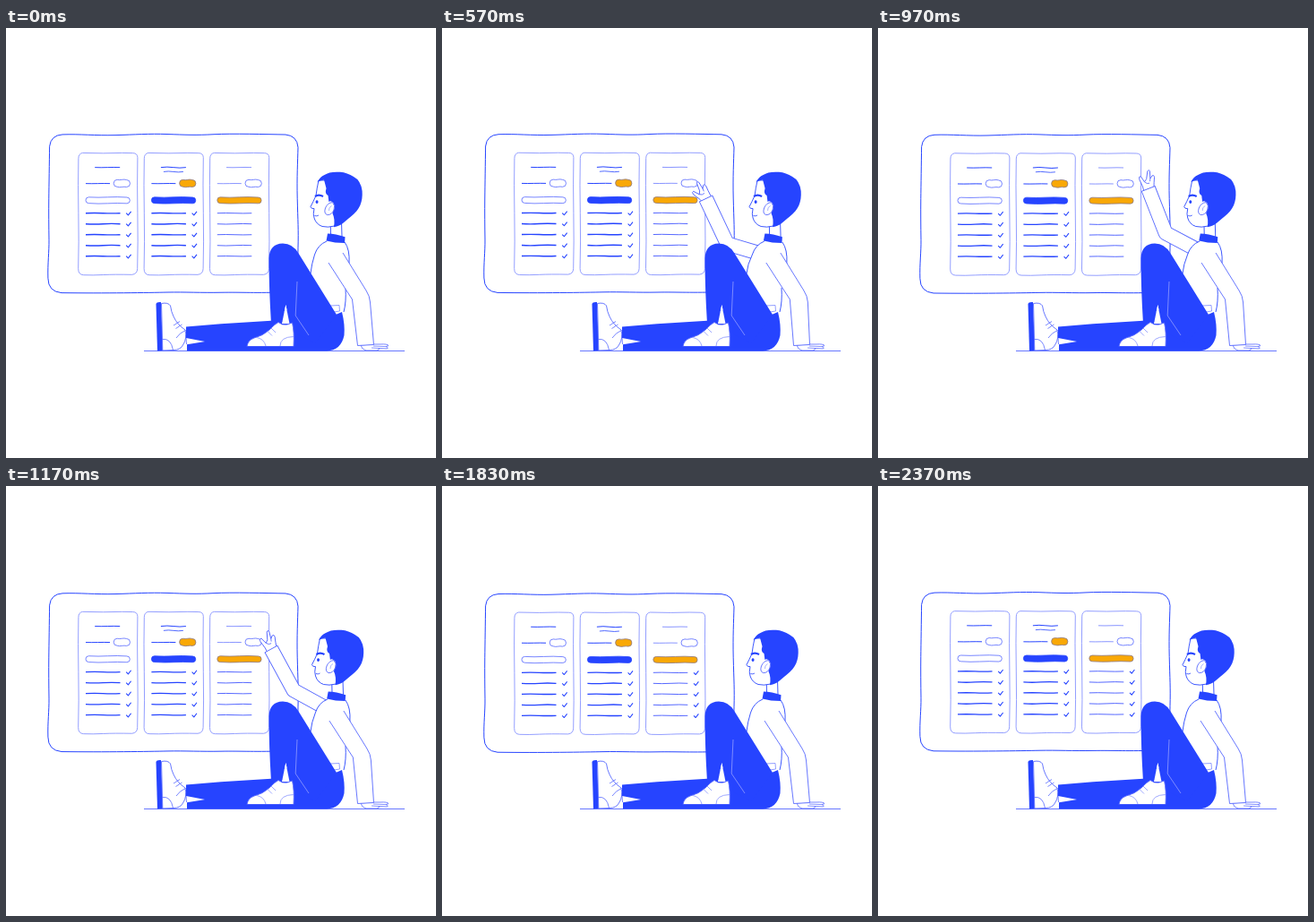
These frames come from a looping animation (480x480 px, 2470 ms). An HTML page with a canvas:

```html
<!DOCTYPE html>
<html lang="en">
<head>
<meta charset="utf-8">
<title>Choosing a plan</title>
<style>
html, body { margin: 0; width: 100%; height: 100%; overflow: hidden; background: #fff; }
canvas { display: block; width: 480px; height: 480px; }
</style>
</head>
<body>
<canvas id="stage" width="480" height="480"></canvas>
<script>
const ctx = document.getElementById('stage').getContext('2d');
const LOOP = 2470;
const BLUE = '#2644ff', SOFT = '#5668ff', PALE = '#8794ff', ORANGE = '#f9a806', WHITE = '#fff';

// time, shoulder y, elbow x/y, cuff x/y, hand angle
const ARM = [
  [0, 262, 345, 300, 317, 285, -62],
  [130, 262, 345, 300, 317, 285, -62],
  [370, 258, 316, 260, 284.5, 217, -68],
  [770, 247, 321, 231, 304.5, 178.5, 0],
  [1170, 246, 321, 228, 296, 182, -17],
  [1530, 258, 325, 291, 278, 276, -56],
  [1720, 262, 345, 300, 317, 285, -62],
  [LOOP, 262, 345, 300, 317, 285, -62]
];
const LEAN = [[0, 0], [100, 0], [370, 4], [770, 2], [1170, 1.5], [1530, 0.9], [1830, 0], [LOOP, 0]];

// Monotone cubic interpolation of one column of a key table
function sample(keys, col, t) {
  const slope = i => i < 0 || i >= keys.length - 1 ? 0
    : (keys[i + 1][col] - keys[i][col]) / (keys[i + 1][0] - keys[i][0]);
  const tangent = i => {
    const a = slope(i - 1), b = slope(i);
    return a * b <= 0 ? 0 : 2 * a * b / (a + b);
  };
  let i = 0;
  while (i < keys.length - 2 && t >= keys[i + 1][0]) i++;
  const span = keys[i + 1][0] - keys[i][0], s = (t - keys[i][0]) / span;
  const a = keys[i][col], b = keys[i + 1][col], r = 1 - s;
  return a + (b - a) * s * s * (3 - 2 * s) + span * s * r * (r * tangent(i) - s * tangent(i + 1));
}

function shape(d, fill, stroke, width = 0.9) {
  const p = new Path2D(d);
  if (fill) { ctx.fillStyle = fill; ctx.fill(p); }
  if (stroke) { ctx.strokeStyle = stroke; ctx.lineWidth = width; ctx.stroke(p); }
}
const line = (d, color = BLUE, width = 0.9) => shape(d, null, color, width);

function moved(dx, dy, draw) {
  ctx.save();
  ctx.translate(dx, dy);
  draw();
  ctx.restore();
}

const wavy = (x, y, w, color, width, k = 0.7) =>
  line(`M${x} ${y} q${w / 4} ${k} ${w / 2} 0 t${w / 2} 0`, color, width);

function pill(x, y, w, h, fill, stroke) {
  const r = h / 2, m = w - h;
  shape(`M${x + r} ${y} q${m / 4} .6 ${m / 2} 0 t${m / 2} .2 a${r} ${r} 0 0 1 0 ${h}
    q${-m / 4} -.6 ${-m / 2} 0 t${-m / 2} -.2 a${r} ${r} 0 0 1 0 ${-h}z`, fill, stroke, 0.8);
}

function card(index, checks) {
  const x = 80.5 + index * 73.4, last = index === 2;
  const ink = last ? SOFT : BLUE, tone = [WHITE, BLUE, ORANGE][index];
  shape(`M${x + 5} 139.2 q24 .8 44 0 l12 .2 q5.2 0 5.4 5 q-.6 30 0 62 t-.2 62 q-.2 6 -6 6.7
    q-20 -.4 -32 .2 t-22 .2 q-6 -.2 -6 -7 q.8 -30 .2 -62 t0 -61 q0 -5.5 4.6 -6.3z`, WHITE, PALE, 0.9);
  wavy(x + (index === 1 ? 19 : 18.7), 155.4, 28, ink, last ? 0.7 : 1, index === 1 ? -1 : 0.3);
  if (index === 1) wavy(x + 22, 160.2, 22, ink, 0.8, -0.9);
  wavy(x + 8.5, 173.4, 27, ink, last ? 0.7 : 1, 0.2);
  pill(x + 39.7, 169.1, 18.3, 8, index === 1 ? ORANGE : WHITE, index === 1 ? '#8a7888' : SOFT);
  pill(x + 8.5, 188.6, 49.3, 6.8, tone, last ? '#8a7888' : index ? BLUE : SOFT);
  for (let i = 0; i < 5; i++) {
    const y = 206.5 + i * 12;
    wavy(x + 8.5, y, 38.5, ink, last ? 1 : 1.35, i % 2 ? 0.6 : -0.4);
    if (i < checks) line(`M${x + 53.7} ${y} l2.2 2.2 l3.2 -4.1`, BLUE, 1.1);
  }
}

function board(t) {
  const swing = (1 - Math.cos((t - 400) / LOOP * Math.PI * 2)) / 2;
  const swiped = Math.max(0, Math.min(5, Math.floor((t - 1300) / 90) + 1));
  moved(0, 2 * swing ** 1.5, () => {
    shape(`M63 118.7 C82 118 100 120 122 119.4 S160 117.6 180 118.3 S212 119.6 232 118.5
      S290 118.4 312 118.8 Q325 120 326 133
      C325.6 150 324.6 165 325.2 190 S326.6 225 326 245 L325.5 281 Q325 294 312 294.6
      C280 295.8 262 294.6 240 295 S200 294.4 180 294.8 S110 296 62 295.4
      Q47 294 46.9 279 C46.4 262 48.2 250 48 236 S47.6 205 47.8 190 S48.4 150 48.6 132
      Q50 119.5 63 118.7z`, WHITE, BLUE, 1);
    for (let i = 0; i < 3; i++) card(i, i < 2 ? 5 : swiped);
  });
}

function pointingArm(t, lean) {
  const [sy, ex, ey, cx, cy, angle] = [1, 2, 3, 4, 5, 6].map(col => sample(ARM, col, t));
  ctx.save();
  ctx.translate(cx, cy);
  ctx.rotate(angle * Math.PI / 180);
  shape(`M-5 3 L-6 -3 L-9 -11.5 Q-9.5 -15 -7 -14.5 L-3.5 -8 L-1 -11 L1 -19.5 Q2.3 -22 3.6 -19.5
    L3.2 -11 L5.6 -14 Q8 -15 8 -12 L7 -6 L6 3z`, WHITE, SOFT);
  line('M-3.5 -8 Q-1 -5 2 -6 M3.2 -11 L2.6 -8', SOFT, 0.8);
  ctx.restore();
  const sleeve = `M${353 + lean / 2} ${sy} L${ex} ${ey} L${cx} ${cy}`;
  line(sleeve, SOFT, 16.8);
  line(sleeve, WHITE, 15);
  const len = Math.hypot(cx - ex, cy - ey);
  const nx = (ey - cy) / len * 8.2, ny = (cx - ex) / len * 8.2;
  line(`M${cx - nx} ${cy - ny} L${cx + nx} ${cy + ny}`, SOFT);
}

function torso(lean) {
  const k = lean * 0.6, at = (x, y) => `${x + k} ${y}`;
  shape(`M${at(358, 238)} Q${at(348, 242)} ${at(344.5, 253)} Q341 264 340 274 L368 322 L376 318
    Q379 312 379 290 L${at(383, 262)} Q${at(384, 247)} ${at(378, 239)}z`, WHITE);
  line(`M${at(358, 238)} Q${at(348, 242)} ${at(344.5, 253)} Q341 264 340 274`);
  line(`M${at(378, 239)} Q${at(384, 247)} ${at(383, 263)} M379 290 Q380 306 377 317`);
  line('M362 310 L372 309.5 L372.5 316 L366 317', PALE);

  // propping arm
  shape('M396 354 Q397 359 402 360 L414 360 Q418 359 416 357.5 L425 358 Q428 357 424 355.6 ' +
    'L427 354.6 Q426 352.5 418 353 L409 353z', WHITE, SOFT, 0.8);
  line('M410 355 L424 355.6 M408 357 L416 357.5', SOFT, 0.7);
  const sleeve = `M${at(376, 251)} L${at(402, 293)} Q${at(406, 299)} ${at(406.5, 306)} L410.5 353.5
    L392.5 354.5 L${at(386.5, 303)} L${at(360, 262)}`;
  shape(sleeve, WHITE, SOFT);
}

function head() {
  shape('M362 216 L362.5 232 L375 233 L374.5 214z', WHITE);
  line('M362.3 221 L362.5 231 M374.5 216 L375 233');
  shape(`M349 170 Q347 179 346 187 Q343 194 340 199.5 Q340.5 202 344 201.6 Q342.5 208 344 212
    Q346 219 353 221.5 Q359 223 367 221 L374 200 L370 170z`, WHITE, BLUE);
  shape(`M347.6 172 Q350.5 166 355.5 164 Q361 160 373 160.8 Q381 161.5 388 166
    Q396 170 397.6 182 C398.4 194 395 203 385 210.5 C379 215 375 221 366 222.3
    Q367.5 213 364.5 207 L366 196 Q363 192 360.4 194 L359.5 187 Q355.5 185 357.5 179
    L355 169.5 Q352 169.5 347.6 172z`, BLUE);
  shape('M356.5 201 Q359 195 364.5 194.6 Q368 198 366 203 Q363.5 209 358.5 208.6 Q354.5 207 356.5 201z',
    WHITE, SOFT);
  line('M363.5 198.5 Q360 200 360.5 204', PALE, 0.7);
  line('M345 188 Q349 185.2 354 188', BLUE, 2.2);
  shape('M347 192.2 a1.5 1.9 0 1 0 .1 0z', BLUE);
  line('M344.5 209.5 Q347 210.5 349 209', BLUE, 0.8);
}

function legs() {
  line('M154 360.5 L445 360.5', SOFT, 0.9);

  // outstretched leg and hip
  shape(`M201 333.5 L240 330.2 L300 326.5 L330 300 L368 320 L375 317 Q378.5 331 377.5 343
    Q374 360 358 360.5 L202 360.5 L202 353.2 L222 350 L201 346z`, BLUE);
  shape('M167.5 308 Q168 305.5 173 306 L175 360 L169 360.5z', BLUE);
  shape(`M173.5 307.5 Q181 306 183.5 310 Q184.5 317 187 322 Q191 331 200 337 Q202 347 198 353
    Q195 359.5 187 359.5 L174.8 360z`, WHITE, SOFT);
  line('M174.5 347.5 Q184 346 186.5 359.5 M187 332 L194 327.5 M189.5 335.5 L196.5 331 M190 346 Q194 340 200.5 337.5',
    SOFT, 0.8);
  line('M201 346 L201.5 353', SOFT, 0.8);

  // bent leg
  shape(`M293.5 257 Q294 241 309 240.5 Q320 240.5 326.5 251.5 L369 320 L345 352 L322 340 L320 329
    L316.5 328 L312.3 309 L308.5 328 L296 330 Q293.5 290 293.5 257z`, BLUE);
  shape('M312.3 309 L316.5 330 L308 330z', WHITE);
  line('M325 283 L323.2 321 L338 343', PALE, 0.9);
  shape(`M269 355.5 Q270 348.5 277 346 Q287 343.5 294 337 Q300 330.5 304 328.5 Q308 332 314 331
    L319.5 329 Q322 339 321 355.5z`, WHITE, SOFT);
  line('M296 335 L301 340 M292 338.5 L297 343.5 M306 355 Q306 345 320.8 344.5 M280 345.5 Q288 347 290 355',
    PALE, 0.8);
  line('M268.8 356 L321 356', BLUE, 1.2);
}

function render(now) {
  const t = now % LOOP, lean = sample(LEAN, 1, t);
  ctx.fillStyle = WHITE;
  ctx.fillRect(0, 0, 480, 480);
  ctx.lineCap = 'butt';
  ctx.lineJoin = 'round';
  board(t);
  pointingArm(t, lean);
  torso(lean);
  moved(lean, 0, head);
  moved(lean * 0.45, 0, () =>
    shape('M359 229.5 Q368 229.5 378.5 233.3 L378 240 Q367 240 357.5 237.5z', BLUE));
  legs();
}

const start = performance.now();
function tick() {
  render(performance.now() - start);
  requestAnimationFrame(tick);
}
tick();
</script>
</body>
</html>
```
